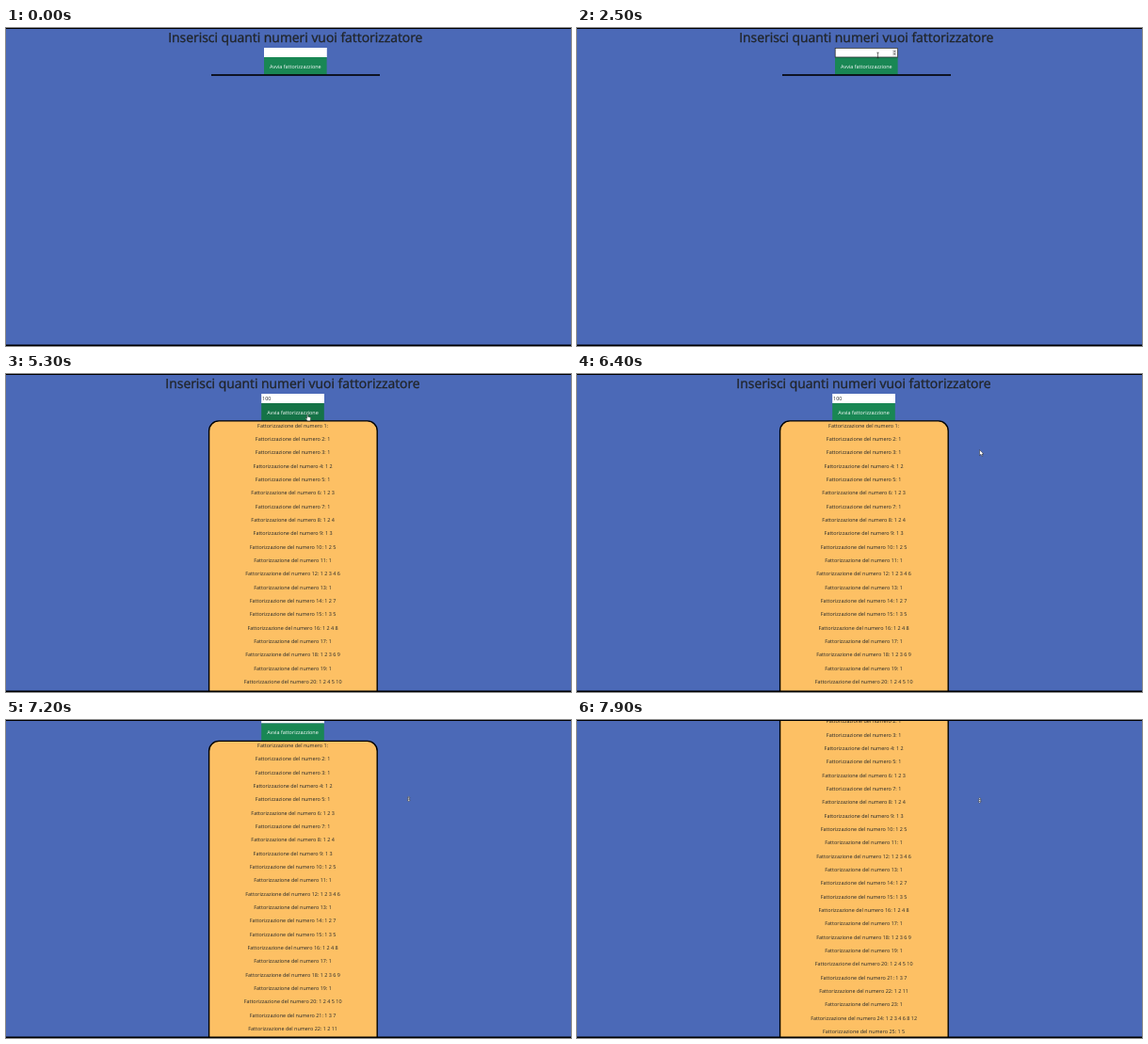
Animation, 600 px wide and 338 px high, one loop 8000 ms. Source, as an HTML page:

```html
<!DOCTYPE html>
<html lang="it">
<head>
<meta charset="utf-8">
<style>
html, body { margin: 0; height: 100%; overflow: hidden; background: #4b69b7; }
svg { display: block; width: 600px; height: 338px; }
text { font: 5.45px "Open Sans", "Noto Sans", sans-serif; fill: #212529; text-rendering: geometricPrecision; }
.mid { text-anchor: middle; }
#title { font-size: 13.9px; stroke: #212529; stroke-width: .35px; }
#cursor > * { stroke-linejoin: round; }
</style>
</head>
<body>
<svg viewBox="0 0 600 338">
  <rect width="600" height="338" fill="#4b69b7"/>
  <g id="page">
    <text id="title" class="mid" x="307.3" y="14.8">Inserisci quanti numeri vuoi fattorizzatore</text>
    <rect x="274" y="21" width="66.8" height="10" fill="#fff"/>
    <rect id="button" x="274" y="31" width="66.6" height="18.6"/>
    <text class="mid" x="307.3" y="42.5" style="fill:#fff">Avvia fattorizzazzione</text>
    <rect id="focus" x="274.2" y="21.4" width="66.2" height="9.6" fill="none" stroke="#2a2d30" stroke-width=".8"/>
    <g id="spinner">
      <rect x="335" y="22.8" width="4.4" height="6.6" fill="#dcdcdc"/>
      <path d="M336 25.4l1.2-1.4 1.2 1.4zM336 27l1.2 1.4 1.2-1.4z" fill="#555"/>
    </g>
    <text id="value" x="274.9" y="28.2"></text>
    <rect id="caret" y="23" width=".5" height="6.4" fill="#111"/>
    <rect id="emptyBox" x="218" y="49.2" width="179" height="1.6"/>
    <g id="results">
      <rect x="218.4" y="49.9" width="178.6" height="1500" rx="10.5" fill="#fdc064" stroke="#000" stroke-width="1.4"/>
    </g>
  </g>
  <g id="cursor">
    <path id="arrow" d="M0 0v6l1.4-1.3 1 2.2 1-.4-1-2.1h1.9z" fill="#fff" stroke="#000" stroke-width=".4"/>
    <path id="beam" d="M-1.2-2.8h2.4M0-2.8v5.6M-1.2 2.8h2.4" fill="none" stroke="#222" stroke-width=".6"/>
    <path id="hand" d="M0 0q.7-.5 1 .2v2.2l2.4.6q.7.2.6 1l-.5 2.8h-3l-2-2.6q.1-.8 1.5.2z" fill="#fff" stroke="#111" stroke-width=".4"/>
    <g id="pan" fill="#fff" stroke="#333" stroke-width=".5">
      <path d="M-1.4-1.2l1.4-1.8 1.4 1.8z"/>
      <circle r="1"/>
      <path d="M-1.6 1.1l1.6 1.7 1.6-1.7z"/>
    </g>
  </g>
  <path d="M0 0h600v1H0zM0 336.6h600v1.4H0z"/>
</svg>
<script>
const LOOP = 8000, STEP = 100, ROWS = 30, ROW_HEIGHT = 14.34;
const CLICK = 4300, RESULTS = 4600, PAN = 6500;
const $ = id => document.getElementById(id);

const cursorPath = [[100, 376, 2], [900, 321, 28], [1100, 319.5, 29], [3700, 319.5, 29],
  [4100, 316.3, 41], [4600, 316.3, 41], [5200, 319.3, 43], [5400, 320, 43],
  [6000, 427.5, 79], [6500, 427.5, 81], [6800, 427.5, 81], [7200, 427.7, 84], [7900, 427.7, 85.5]];
const scrollPath = [[6600, 0], [6800, 8], [7200, 27.5], [7900, 67.5]];

function along(path, t) {
  if (t <= path[0][0]) return path[0].slice(1);
  const i = path.findIndex(p => p[0] > t);
  if (i < 0) return path[path.length - 1].slice(1);
  const a = path[i - 1], b = path[i], k = (t - a[0]) / (b[0] - a[0]);
  return a.slice(1).map((v, j) => v + (b[j + 1] - v) * k);
}

function show(id, on) { $(id).style.display = on ? "" : "none"; }

for (let n = 1; n <= ROWS; n++) {
  const divisors = Array.from({ length: n - 1 }, (_, i) => i + 1).filter(d => n % d === 0);
  const row = document.createElementNS("http://www.w3.org/2000/svg", "text");
  row.setAttribute("class", "mid");
  row.setAttribute("x", 307.4);
  row.setAttribute("y", 56.5 + (n - 1) * ROW_HEIGHT);
  row.textContent = `Fattorizzazione del numero ${n}: ${divisors.join(" ")}`.trim();
  $("results").append(row);
}

function draw(t) {
  const done = t >= RESULTS, focused = t >= 1300 && t < CLICK;
  const [x, y] = along(cursorPath, t), [scroll] = along(scrollPath, t);
  const overInput = t < CLICK && x < 341 && y > 21 && y < 31;
  const overButton = t > 3700 && x < 340 && y >= 31 && y < 50;

  // The scrollbar that comes with the results moves the centre left.
  $("page").setAttribute("transform", `translate(${done ? -2.8 : 0} ${-scroll})`);
  $("button").setAttribute("fill", overButton ? "#157347" : "#198754");
  $("value").textContent = t >= 3400 ? "100" : t >= 2700 ? "1" : "";
  $("caret").setAttribute("x", t >= 3400 ? 284.5 : t >= 2700 ? 278.4 : 275);
  show("caret", focused && t >= 2000 && !(t >= 2500 && t < 2700) && t < 3800);
  show("focus", focused);
  show("spinner", overInput || focused);
  show("emptyBox", !done);
  show("results", done);

  const kind = t >= PAN ? "pan" : overButton ? "hand" : overInput ? "beam" : "arrow";
  for (const id of ["arrow", "beam", "hand", "pan"]) show(id, id === kind);
  show("cursor", t >= 100);
  $("cursor").setAttribute("transform", `translate(${x} ${y})`);
}

function tick() {
  draw(Math.floor(performance.now() % LOOP / STEP) * STEP);
  requestAnimationFrame(tick);
}
tick();
</script>
</body>
</html>
```
